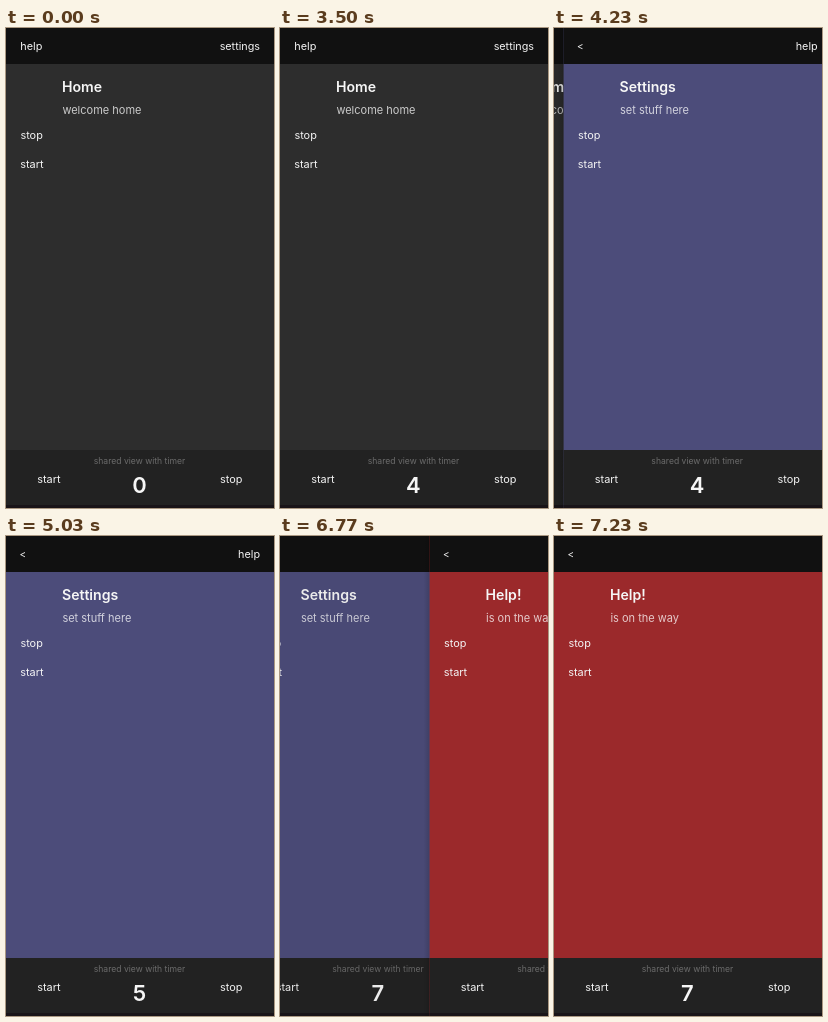
An HTML page with a canvas that plays this animation: 268x480 px, repeating every 7.37 s.

```html
<!DOCTYPE html>
<html lang="en">
<head>
<meta charset="utf-8">
<title>Shared timer</title>
<style>
  html, body { margin: 0; width: 100%; height: 100%; overflow: hidden; background: #111; }
  canvas { display: block; width: 100vw; height: 100vh; }
</style>
</head>
<body>
<canvas id="stage"></canvas>
<script>
const W = 268, H = 480, LOOP = 7370;
const STEP = 1000 / 15;          // screen refresh interval
const FONT = 'Inter, "Open Sans", sans-serif';
const canvas = document.getElementById('stage');
const ctx = canvas.getContext('2d');

const pages = {
  home: { color: '#2d2d2d', title: 'Home', sub: 'welcome home', left: 'help', right: 'settings' },
  settings: { color: '#4c4c7a', title: 'Settings', sub: 'set stuff here', left: '<', right: 'help' },
  help: { color: '#9b292b', title: 'Help!', sub: 'is on the way', left: '<', right: '' }
};

const pushes = [
  { from: 'home', to: 'settings', press: 3630, start: 3881 },
  { from: 'settings', to: 'help', press: 6560, start: 6664 }
];
const PUSH_TIME = 540;

// Critically damped spring from 0 to 1
function spring(ms) {
  if (ms <= 0) return 0;
  if (ms >= PUSH_TIME) return 1;
  const x = ms * 0.0146;
  return 1 - (1 + x) * Math.exp(-x);
}

function rect(x, y, w, h, color) {
  ctx.fillStyle = color;
  ctx.fillRect(x, y, w, h);
}

function text(str, x, y, size, color = '#f4f4f4', weight = 400, align = 'left') {
  ctx.font = `${weight} ${size}px ${FONT}`;
  ctx.textAlign = align;
  ctx.fillStyle = color;
  ctx.fillText(str, x, y);
}

function drawPage(page, x, count, pressed) {
  ctx.save();
  ctx.translate(x, 0);

  rect(0, 0, W, H, page.color);
  rect(0, 0, W, 36, '#111111');
  if (page.left === '<') text('<', 16.8, 22, 10, '#f4f4f4', 400, 'center');
  else text(page.left, 14.3, 22, 10.9);
  text(page.right, 254, 22, 10.8, pressed ? 'rgba(244,244,244,.3)' : '#f4f4f4', 400, 'right');

  text(page.title, 56, 64, 14.1, '#f6f6f6', 600);
  text(page.sub, 56.4, 86, 11, 'rgba(255,255,255,.75)');
  text('stop', 14.4, 111, 10.9);
  text('start', 14.2, 140, 10.9);

  rect(0, 422, W, 58, '#222222');
  rect(0, 477, W, 3, '#191418');
  text('shared view with timer', 133.5, 436, 8.6, '#6c6c6c', 400, 'center');
  text('start', 31.2, 455, 10.9);
  text('stop', 214, 455, 10.9);
  text(count, 133.4, 465, 22, '#f6f6f6', 600, 'center');

  ctx.restore();
}

function drawShadow(x) {
  const g = ctx.createLinearGradient(x - 6, 0, x, 0);
  g.addColorStop(0, 'rgba(0,0,0,0)');
  g.addColorStop(1, 'rgba(0,0,0,.14)');
  rect(x - 6, 0, 6, H, g);
}

function render(t) {
  const count = Math.floor((t + 500.5) / 1000);
  const push = t < 4800 ? pushes[0] : pushes[1];
  const p = spring(t - push.start);
  if (p === 1) {
    drawPage(pages[push.to], 0, count, false);
    return;
  }
  const pressed = t >= push.press && t < push.start;
  drawPage(pages[push.from], -0.3 * W * p, count, pressed);
  if (p > 0) {
    const x = W * (1 - p);
    rect(0, 0, x, H, `rgba(0,0,0,${0.1 * p})`);
    drawShadow(x);
    drawPage(pages[push.to], x, count, false);
  }
}

function resize() {
  const dpr = window.devicePixelRatio || 1;
  canvas.width = Math.round(innerWidth * dpr);
  canvas.height = Math.round(innerHeight * dpr);
}

const begin = performance.now();

function frame() {
  const t = (performance.now() - begin) % LOOP;
  const held = (Math.floor((t + 4) / STEP - 0.5) + 0.5) * STEP;
  ctx.setTransform(canvas.width / W, 0, 0, canvas.height / H, 0, 0);
  render(Math.max(0, held));
  requestAnimationFrame(frame);
}

addEventListener('resize', resize);
resize();
frame();
</script>
</body>
</html>
```
